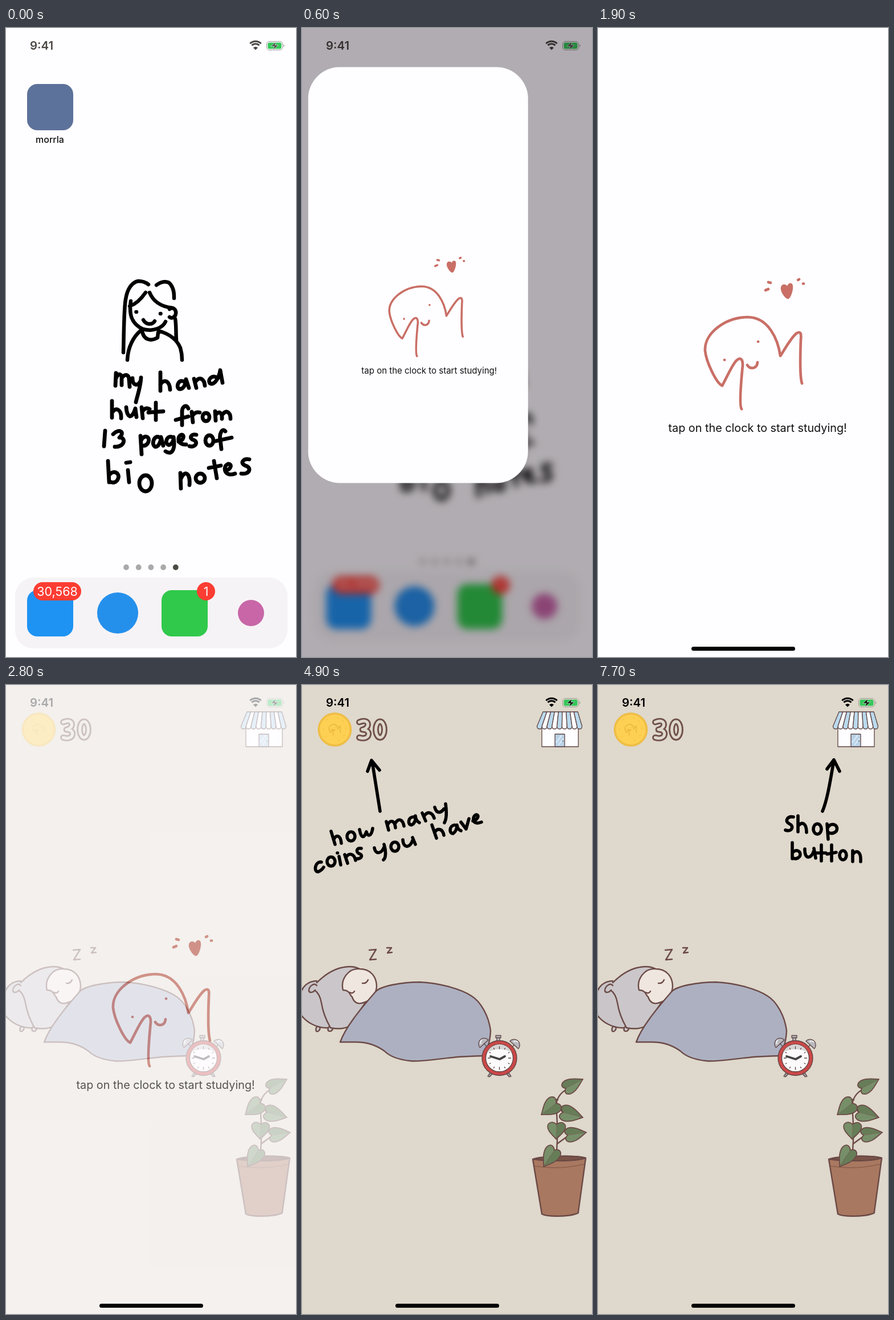
Write an HTML page that moves like this. It is 509 px wide and 1101 px high and loops after 7800 ms.

```html
<!DOCTYPE html>
<html lang="en">
<head>
<meta charset="utf-8">
<title>Study app walkthrough</title>
<style>
html, body { margin: 0; width: 100%; height: 100%; overflow: hidden; background: #fefdff; }
svg { display: block; width: 100%; height: 100%; }
text { font-family: Inter, "Open Sans", sans-serif; }
.ink { fill: none; stroke: #000; stroke-linecap: round; stroke-linejoin: round; }
.line { fill: none; stroke: #6b4a46; stroke-width: 2.4; stroke-linecap: round; stroke-linejoin: round; }
.thin { stroke: #5d4443; stroke-width: 1.3; stroke-linejoin: round; stroke-linecap: round; }
</style>
</head>
<body>
<svg id="stage" viewBox="0 0 509 1101"></svg>
<script>
const LOOP = 7800, W = 509, H = 1101;
const stage = document.getElementById('stage');

const ink = (d, w) => `<path class="ink" stroke-width="${w}" d="${d}"/>`;
const line = (d, fill = 'none') => `<path class="line" d="${d}" style="fill:${fill}"/>`;
const dot = (x, y, r, fill) => `<circle cx="${x}" cy="${y}" r="${r}" fill="${fill}"/>`;
const box = (x, y, w, h, r, fill) => `<rect x="${x}" y="${y}" width="${w}" height="${h}" rx="${r}" fill="${fill}"/>`;
const ring = (x, y, rx, ry) => `M${x - rx} ${y}a${rx} ${ry} 0 1 0 ${2 * rx} 0a${rx} ${ry} 0 1 0 ${-2 * rx} 0`;
const range = n => [...Array(n).keys()];

function statusBar(color) {
  const arcs = [4.5, 9, 13.5].map((r, i) => {
    const d = r * 0.72, y = 37 - r * 0.72;
    return i ? `<path d="M${438 - d} ${y}A${r} ${r} 0 0 1 ${438 + d} ${y}" fill="none" stroke="${color}" stroke-width="3"/>`
             : `<path d="M438 38.5L434 34.5Q438 31 442 34.5Z" fill="${color}"/>`;
  }).join('');
  return `<text x="42" y="38" font-size="20.4" font-weight="600" fill="${color}">9:41</text>${arcs}
    <rect x="457.5" y="23.5" width="28" height="15" rx="4.5" fill="none" stroke="#9c9a98"/>
    ${box(459.5, 25.5, 24, 11, 2.8, '#35c759')}
    <path d="M487 28.5Q490 31 487 33.5Z" fill="#9c9a98"/>
    <path d="M474 24L465 32H471L468.5 38.5L478 30H472Z" fill="${color}" stroke="#fff" stroke-width=".6"/>`;
}

const portrait = `M206 568C207 530 207 490 210 475C213 455 222 445 232 443Q243 443 250 449
  M264 450C272 444 284 441 289 449C295 457 295 466 295 473
  M245 463C236 476 226 484 217 487 M252 463C258 478 272 488 292 490
  M219 478C216 500 219 517 240 527C258 532 275 525 280 514
  M287 492C294 487 299 494 298 500C297 507 290 509 287 506 M297 509C299 520 298 535 299 546
  M228.5 497h.5 M271 500h.5 M241 511C246 520 257 520 261 513
  M236 530C224 540 214 558 213 581 M239 531C242 546 254 549 266 542L267 533
  M268 530C285 535 300 545 306 560Q309 570 309 581`;

const wallText = `M193 604L192 626M193 613C198 602 204 606 203 614V625M203 613C210 603 216 608 216 616L217 628
  M222 613C222 627 232 627 236 618M237 612C236 630 230 645 228 655
  M271 603V635M271 624C278 613 287 618 288 633
  M314 620C304 612 297 628 304 632C312 633 316 622 316 615L321 630
  M330 614L334 630M332 620C340 608 348 615 349 626
  M372 613C362 605 353 616 358 622C366 626 374 612 376 599L380 621
  M186 653V682M187 672C193 663 203 668 202 683 M211 664C212 680 220 688 227 666L229 681
  M238 664L240 683M239 672Q244 663 252 667 M263 656V686M250 673L276 671
  M320 666C317 658 309 662 309 672V695M298 686L320 680
  M326 672L328 690M327 679Q332 671 340 673 ${ring(351, 681, 6, 7)}
  M367 671L368 687M368 677C374 669 380 674 379 684M379 678C386 667 394 672 394 684
  M174 705L172 732 M188 711C198 700 210 707 199 717C211 716 209 734 191 733
  M236 714L238 746M237 722C244 708 256 718 248 728Q243 733 238 730
  M270 717C260 710 254 730 262 733C269 733 272 722 272 716L276 731
  M293 717C284 710 276 727 286 730C293 728 295 718 294 716C298 740 290 748 280 741
  M303 724C312 722 314 712 308 712C300 714 300 730 316 729
  M334 712C324 710 321 719 329 721C338 724 333 735 322 732
  ${ring(357, 722, 7, 9)} M385 706C380 699 374 710 376 720L378 737M368 723L396 717
  M179 758L181 795M181 783C188 772 200 779 197 788C194 797 186 797 181 793
  M214 774L216 795M211 761L218 760 ${ring(245, 797, 11, 14)}
  M306 779L307 806M307 789C314 772 324 780 322 800 ${ring(341, 788, 8, 8)}
  M365 758L370 788M356 770L377 766
  M385 775C396 772 397 763 390 763C380 766 382 787 402 780
  M427 755C416 753 410 762 420 766C432 769 428 782 413 780`;

const coinNote = `M137 221L123 133M115 151L122 132L136 149
  M51 256L58 279M56 270C60 261 68 263 69 277 ${ring(86, 265, 7, 8)}
  M101 253C104 270 109 268 113 257C116 267 122 264 124 251
  M148 239L152 254M150 245C156 234 163 238 164 250M163 243C170 231 177 236 179 247
  M196 231C186 230 185 245 192 245C198 243 200 235 199 229Q200 238 206 241
  M211 224L217 238M214 230C221 219 229 224 232 233
  M233 214C236 226 244 224 249 217M252 208C254 222 254 234 250 241
  M34 310C23 308 20 327 28 327Q34 325 38 319 ${ring(51, 309, 7, 8)}
  M65 300L68 315M62 294h.5 M75 297L80 312M77 302C83 292 92 296 94 307
  M104 286C96 284 94 292 100 295C108 297 104 305 97 304
  M127 285C129 297 139 296 144 284M144 279C148 292 147 303 143 306 ${ring(163, 283, 7, 8)}
  M177 271C178 287 190 285 194 272M194 267L199 279
  M228 245L236 268M233 258C238 249 247 252 249 263
  M268 245C258 246 258 260 265 260C270 257 272 250 272 245Q273 253 279 255
  M279 240L288 252L293 234 M300 238C308 236 312 228 306 227C298 229 298 247 315 240`;

const shopNote = `M394 221C403 200 408 165 414 132M402 147L414 131L424 151
  M343 231C332 229 327 239 336 243C345 247 340 258 329 254
  M351 229V257M352 246C359 238 366 243 366 258 ${ring(385, 252, 7, 9)}
  M402 243L404 270M403 250C410 238 424 246 418 256Q412 262 404 258
  M341 276V304M341 294C348 285 358 292 354 300Q348 307 341 302
  M363 287C362 305 374 306 379 290M379 286L382 303
  M392 280V308M384 294L400 294M410 280V308M402 296L418 293 ${ring(430, 298, 6, 8)}
  M447 290V309M447 297C453 288 462 290 461 309`;

// The little creature on the loading screen, reused on the coin.
const creature = `M252 667C247 660 252 610 254 590C254 578 249 576 242 583C233 594 226 612 218 626
  C208 622 190 585 188 565C186 535 222 507 262 506C300 506 316 546 320 574
  C328 562 340 540 349 534C356 530 357 536 356 545C355 570 354 610 358 622
  M262 590C267 598 279 597 280 585 M222 581h.1 M281 549h.1`;

const splash = `${box(0, 0, W, 2 * H, 0, '#fefdff')}
  <g class="ink" style="stroke:#c96f66" stroke-width="4.7">
    <path d="${creature}"/>
    <path d="M299 445L303 446M294 459L299 457M351 441L353 440M360 447.5H361"/>
    <path d="M332 455C330 447 321 449 322 457C323 464 330 473 334 473C338 470 343 455 340 449C337 446 333 450 332 455Z" style="fill:#c96f66" stroke-width="2.5"/>
  </g>
  <text x="123.5" y="707" font-size="19.8" fill="#111">tap on the clock to start studying!</text>`;

function badge(x, y, w, label) {
  return box(x, y, w, 32, 16, '#fc3d33') +
    `<text x="${x + w / 2}" y="${y + 23.5}" font-size="21.5" fill="#fff" text-anchor="middle">${label}</text>`;
}

const dock = range(5).map(i => dot(211 + i * 21.7, 944, 4.9, i < 4 ? '#aaa8a8' : '#4b4a45')).join('') +
  box(16, 962, 478, 124, 32, '#f6f3f6') +
  box(37, 984, 81, 81, 18, '#1e93f3') + badge(48, 970, 84, '30,568') +
  dot(196, 1024, 36, '#2590ec') +
  box(273, 984, 81, 81, 18, '#30c94b') + badge(335, 970, 32, '1') +
  dot(430, 1024, 23, '#c866a8');

// Heart-shaped leaf from base to tip; spread is its half width relative to its length.
function leaf(bx, by, tx, ty, spread) {
  const len = Math.hypot(tx - bx, ty - by), turn = Math.atan2(ty - by, tx - bx) * 180 / Math.PI;
  const half = side => {
    const k = side * spread;
    return `C-.3 ${-.67 * k} 0 ${-1.3 * k} .4 ${-.92 * k}C.65 ${-.7 * k} .85 ${-.2 * k} 1 0`;
  };
  const part = (side, fill) => `<path d="M0 0${half(side)}Z" fill="${fill}"/>`;
  return `<g transform="translate(${bx} ${by}) rotate(${turn}) scale(${len})">
    ${part(1, '#667d58')}${part(-1, '#768f68')}
    <path d="M0 0${half(1)}M0 0${half(-1)}" class="line" style="stroke-width:1.8;vector-effect:non-scaling-stroke"/>
    <path d="M0 0H.9" class="line" style="stroke-width:.6;vector-effect:non-scaling-stroke"/></g>`;
}

function coin() {
  const digits = `M100.5 65C119 57 120 76 106 78C123 78 119 98 100.5 92 ${ring(137, 78, 7.5, 14)}`;
  return `<circle cx="57.5" cy="78" r="28" fill="#fdcf52" stroke="#efbd45" stroke-width="3.5"/>
    <g transform="translate(24.5 8) scale(.12)"><path class="ink" style="stroke:#e9b640" stroke-width="12" d="${creature}"/></g>` +
    [[38, 77], [42, 90], [45, 61], [63, 58], [72, 63], [77, 76], [74, 88], [64, 97]].map(p => dot(...p, 1.1, '#f0c044')).join('') +
    `<path class="ink" style="stroke:#6f5149" stroke-width="10.8" d="${digits}"/>
     <path class="ink" style="stroke:#dfd8cc" stroke-width="5" d="${digits}"/>`;
}

function shop() {
  const n = 9, top = 61 / n, low = 79 / n;
  const stripes = range(n).map(i => {
    const a = 423 + i * top, b = 412.5 + i * low;
    return `<path class="thin" fill="${i % 2 ? '#fefdff' : '#bad9ec'}"
      d="M${a} 47h${top}L${b + low} 72Q${b + low} 77 ${b + low / 2} 77Q${b} 77 ${b} 72Z"/>`;
  }).join('');
  return `<rect class="thin" x="421" y="70" width="64" height="38" fill="#fefdff"/>
    <rect class="thin" x="444" y="86" width="17" height="22" fill="#b8d2e8"/>
    <path d="M446 101L456 88M450 105L459 94" stroke="#d9e8f3" stroke-width="2.5"/>${dot(458, 98, 1, '#5d4443')}${stripes}`;
}

function clock() {
  const bell = (x, y, turn) => `<g transform="translate(${x} ${y}) rotate(${turn})">
    <path class="thin" d="M-10 4C-9 -9 9 -9 10 4Z" fill="#b9bac0"/><path class="thin" d="M0 4V9"/>
    <path d="M-4 1C-4 -3 -1 -4 2 -4" stroke="#eee" stroke-width="2" fill="none"/></g>`;
  const ticks = range(12).map(i => `<path class="thin" d="M346.5 633V${i % 3 ? 635 : 637}" transform="rotate(${i * 30} 346.5 653)"/>`).join('');
  return `<path class="thin" d="M331 677L326 685L329 686L335 680M362 677L367 685L364 686L358 680" fill="#98989c"/>
    ${bell(317, 625, -42)}${bell(375, 627, 42)}
    <rect class="thin" x="342" y="616" width="5" height="8" fill="#b9bac0"/>
    <rect class="thin" x="340" y="613.5" width="9" height="4" fill="#b9bac0"/>
    <circle class="thin" cx="346.5" cy="653" r="30.5" fill="#cb4848"/>
    <circle class="thin" cx="346.5" cy="653" r="24" fill="#fcfafa"/>
    <path d="M325 643A23.5 23.5 0 0 1 368 643Q347 632 325 643Z" fill="#d7d4d4"/>${ticks}
    <path class="ink" style="stroke:#454343" stroke-width="3.8" d="M331 650L347 655L356 650"/>`;
}

const sleeper =
  line('M-4 545C0 526 12 518 26 518L50 600C26 602 6 590 -4 574Z', '#c9c5c9') +
  line('M25 606C23 599 27 596 31 599C33 602 29 608 25 606ZM46 605C44 599 50 595 54 599C55 604 50 608 46 605Z', '#c9c5c9') +
  line('M26 521C42 505 62 493 84 493C92 493 98 495 103 498L112 555L83 597C73 603 60 602 50 600C42 586 36 570 34 556C32 545 28 538 22 534', '#cbc6c9') +
  line('M26 526C21 520 12 528 12 535C13 540 20 538 23 534', '#c9c5c9') +
  line('M72 534C67 515 82 495 101 497C120 497 131 510 131 528C130 542 120 553 108 556C97 560 91 555 88 546C84 543 84 534 72 534Z', '#efe6df') +
  line('M106 522Q113 523 116 516M84 538Q89 541 92 536') +
  line('M67 625C76 600 100 570 129 537C137 527 175 520 207 520C245 522 280 533 297 544C314 554 328 580 331 605C330 630 322 646 317 649C300 650 280 650 265 652C240 654 210 660 190 658C172 656 155 651 145 641C130 630 112 625 95 625Z', '#adb0c1') +
  line('M118 464L130 463L119 481L130 480M149 460L157 460L150 469L158 468');

const plant =
  line('M447 815C449 790 448 760 446 738C446 722 456 712 466 707M448 803Q456 797 466 790M446 738Q453 741 459 750M446 737C440 730 444 724 449 726') +
  line('M405 830C420 824 480 823 498 828L485 922C486 925 482 925 480 926C465 931 430 931 421 926Z', '#a97860') +
  line('M407 830C430 824 480 823 497 828C480 834 430 834 407 830Z', '#7b5347') +
  `<path d="M408 842Q450 849 495 839" fill="none" stroke="#8b5e4c" stroke-width="1.5"/>` +
  leaf(463, 706, 493, 690, 0.35) + leaf(446, 732, 420, 752, 0.44) + leaf(458, 748, 493, 757, 0.37) +
  leaf(447, 769, 446, 795, 0.58) + leaf(466, 788, 499, 783, 0.36) + leaf(443, 814, 424, 843, 0.4);

stage.innerHTML = `
  <defs><clipPath id="windowClip"><rect id="windowShape"/></clipPath></defs>
  ${box(0, 0, W, H, 0, '#fefdff')}
  <g id="home">
    <g id="wall">${ink(portrait, 6.5)}${ink(wallText, 6.8)}</g>
    <g id="apps">${dock}
      <text id="label" x="77" y="201" font-size="16" font-weight="500" fill="#111" text-anchor="middle">morrla</text>
    </g>
  </g>
  ${statusBar('#4b4743')}
  <rect id="dim" width="509" height="1101" fill="#0a000a"/>
  <g clip-path="url(#windowClip)">
    <g id="splash">${splash}</g>
    <rect id="icon" width="509" height="1101" fill="#5d729a"/>
  </g>
  <g id="room">
    ${box(0, 0, W, H, 0, '#dfd8cc')}${statusBar('#000')}${coin()}${shop()}${sleeper}${clock()}${plant}
    <g id="coinNote">${ink(coinNote, 5.6)}</g>
    <g id="shopNote">${ink(shopNote, 5.6)}</g>
  </g>
  <g id="bar">${box(164, 1083, 182, 7, 3.5, '#000')}</g>`;

const el = {};
stage.querySelectorAll('[id]').forEach(n => { el[n.id] = n; });
const set = (node, attrs) => Object.entries(attrs).forEach(([k, v]) => node.setAttribute(k, v));
const show = (node, on) => { node.style.display = on ? '' : 'none'; };
const ramp = (t, a, b) => Math.min(1, Math.max(0, (t - a) / (b - a)));
const mix = (a, b, p) => a + (b - a) * p;

// Critically damped spring, time in ms.
function spring(t, start, rate) {
  const x = Math.max(0, t - start) / 1000 * rate;
  return x > 9 ? 1 : 1 - (1 + x) * Math.exp(-x);
}

const zoom = (cx, cy, s) => `translate(${cx} ${cy}) scale(${s}) translate(${-cx} ${-cy})`;

function draw(t) {
  const p = spring(t, 425, 14.3), q = spring(t, 441.5, 13.6);
  const w = mix(81, W, p), h = mix(81, H, q);
  const x = mix(77.5, W / 2, p) - w / 2, y = mix(138.5, H / 2, p) - h / 2;
  const r = mix(18, 56, Math.min(1, p * 1.4)) * (1 - ramp(t, 800, 1200));
  set(el.windowShape, { x, y, width: w, height: h, rx: r });
  set(el.splash, { transform: `translate(${x} ${y}) scale(${w / W})` });
  set(el.icon, { opacity: Math.max(0, 1 - p * 1.8) });

  set(el.wall, { transform: zoom(249, 550, 1 + 0.07 * p) });
  set(el.apps, { transform: zoom(W / 2, 550, 1 - 0.035 * p) });
  el.home.style.filter = p > 0 ? `blur(${Math.min(9, 10 * p)}px)` : 'none';
  show(el.label, p === 0);
  set(el.dim, { opacity: 0.49 * p ** 1.28 });

  const roomIn = ramp(t, 2700, 3000);
  set(el.room, { opacity: roomIn });
  show(el.room, roomIn > 0);
  show(el.coinNote, t >= 3500 && t < 5600);
  show(el.shopNote, t >= 5600);
  set(el.bar, { opacity: ramp(t, 900, 1200) });
}

const begin = performance.now();
function tick() {
  const t = (performance.now() - begin) % LOOP;
  draw(Math.floor(t / 100) * 100);
  requestAnimationFrame(tick);
}
tick();
</script>
</body>
</html>
```
